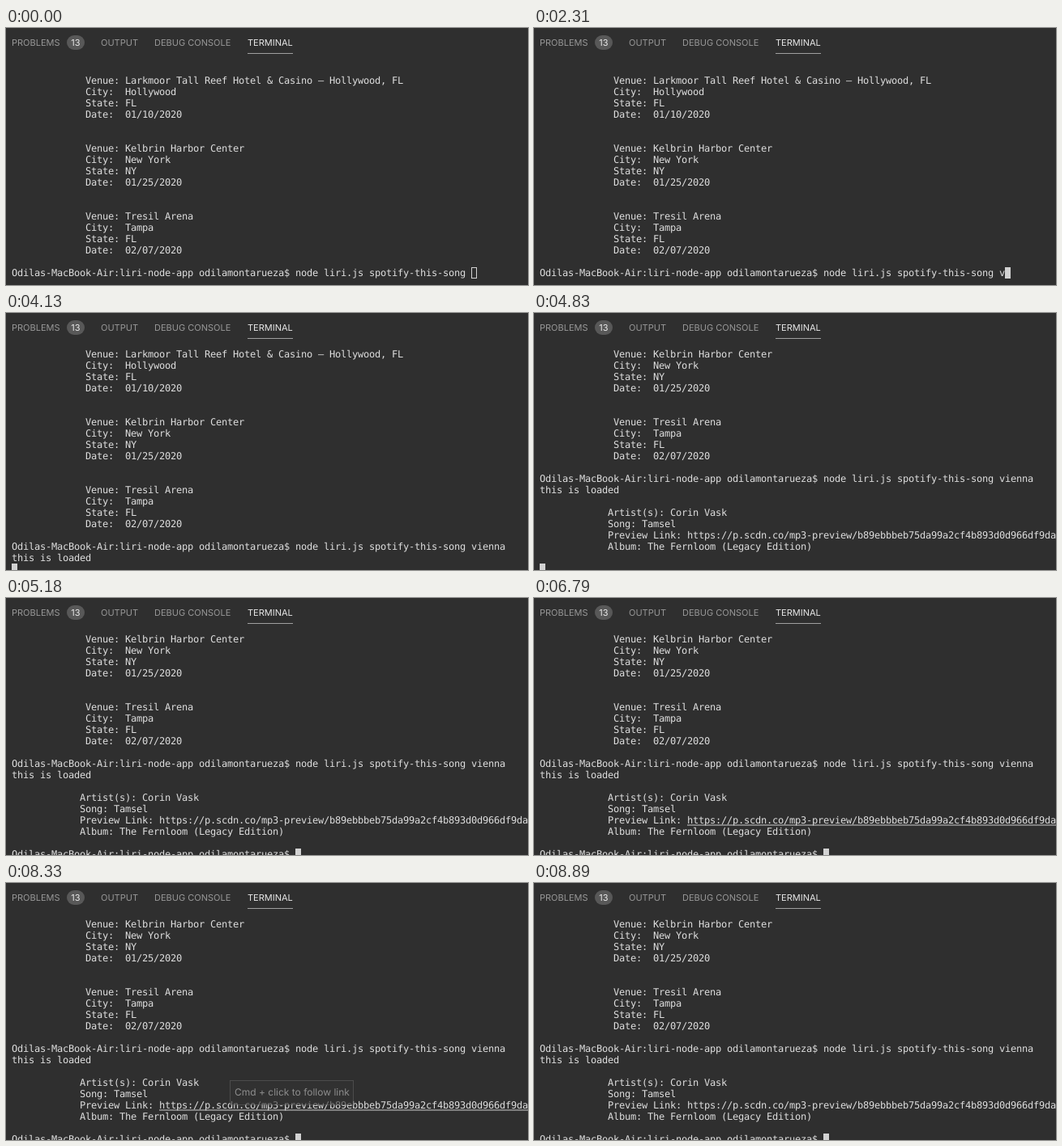
An HTML page that plays this animation: 644 px wide and 318 px high, repeating every 9170 ms.

```html
<!DOCTYPE html>
<html lang="en">
<head>
<meta charset="utf-8">
<title>Terminal</title>
<style>
  html, body { margin: 0; width: 100%; height: 100%; overflow: hidden; background: #2f2f2f; }
  svg { display: block; }
  text { white-space: pre; text-rendering: geometricPrecision; }
  .ui { font: 11px Inter, sans-serif; fill: #989898; }
  .ui .on { fill: #e9e9e9; }
  .term { font: 12px "DejaVu Sans Mono", monospace; fill: #dedede; }
  .tip { font: 12px Inter, sans-serif; fill: #cccccc; }
</style>
</head>
<body>
<svg id="stage" width="644" height="318" viewBox="0 0 644 318">
  <defs><clipPath id="view"><rect y="43" width="644" height="275"/></clipPath></defs>
  <rect width="644" height="318" fill="#2f2f2f"/>
  <g class="ui">
    <text x="7" y="22">PROBLEMS</text>
    <rect x="75" y="9" width="22" height="18" rx="9" fill="#585858"/>
    <text class="on" x="86" y="22" text-anchor="middle">13</text>
    <text x="117" y="22">OUTPUT</text>
    <text x="183" y="22">DEBUG CONSOLE</text>
    <text class="on" x="298" y="22">TERMINAL</text>
    <rect x="298" y="31" width="56" height="1" fill="#a0a0a0"/>
  </g>
  <g clip-path="url(#view)">
    <g id="lines" class="term"></g>
    <rect id="cursor" stroke="#d2d2d2"/>
    <rect id="underline" x="189" y="280.5" width="455" height="1" fill="#d0d0d0"/>
  </g>
  <g id="tip" class="tip">
    <rect x="276.5" y="244.5" width="152" height="30" fill="#333333" stroke="#606060"/>
    <text x="282" y="263">Cmd + click to follow link</text>
  </g>
</svg>
<script>
const LOOP = 9170, CELL = 7, ROW = 14, LEFT = 7, TOP = 44;
const FOCUS = 1120, ENTER = 3920, LOADED = 4060, RESULT = 4830, DONE = 4900;
const KEYS = [2310, 2520, 2730, 2940, 3080, 3290];
const WORD = 'vienna';
const PROMPT = 'Odilas-MacBook-Air:liri-node-app odilamontarueza$ ';
const COMMAND = PROMPT + 'node liri.js spotify-this-song ';

const $ = id => document.getElementById(id);
const set = (el, attrs) => {
  for (const key in attrs) el.setAttribute(key, attrs[key]);
};
const show = (el, on) => set(el, { visibility: on ? 'visible' : 'hidden' });
const within = (t, from, to) => t >= from && t < to;
const cellX = col => LEFT + col * CELL;

const lines = [];

// Each character sits in its own terminal cell.
function addLine(row, col, text, at = 0) {
  const el = document.createElementNS('http://www.w3.org/2000/svg', 'text');
  set(el, { x: [...text].map((_, i) => cellX(col + i)).join(' '), y: TOP + row * ROW + 11 });
  el.textContent = text;
  $('lines').append(el);
  lines.push({ el, at });
  return el;
}

function addShow(row, venue, city, state, date) {
  addLine(row, 13, 'Venue: ' + venue);
  addLine(row + 1, 13, 'City:  ' + city);
  addLine(row + 2, 13, 'State: ' + state);
  addLine(row + 3, 13, 'Date:  ' + date);
}

addShow(1, 'Larkmoor Tall Reef Hotel & Casino – Hollywood, FL', 'Hollywood', 'FL', '01/10/2020');
addShow(7, 'Kelbrin Harbor Center', 'New York', 'NY', '01/25/2020');
addShow(13, 'Tresil Arena', 'Tampa', 'FL', '02/07/2020');
addLine(18, 0, COMMAND);
const typed = addLine(18, COMMAND.length, WORD);
addLine(19, 0, 'this is loaded', LOADED);
[
  'Artist(s): Corin Vask',
  'Song: Tamsel',
  'Preview Link: https://p.scdn.co/mp3-preview/b89ebbbeb75da99a2cf4b893d0d966df9da',
  'Album: The Fernloom (Legacy Edition)'
].forEach((text, i) => addLine(21 + i, 12, text, RESULT));
addLine(26, 0, PROMPT, DONE);

function drawCursor(t, count) {
  const col = t < ENTER ? COMMAND.length + count : t < DONE ? 0 : PROMPT.length;
  const y = TOP + (t < ENTER ? 18 : 19) * ROW;
  const solid = t >= FOCUS;
  const inset = solid ? 0 : 0.5;
  set($('cursor'), {
    x: cellX(col) + inset, y: y + inset,
    width: CELL - 2 * inset, height: ROW - 2 * inset,
    fill: solid ? '#d2d2d2' : 'none',
    'stroke-width': solid ? 0 : 1
  });
}

function tipOpacity(t) {
  if (within(t, 8330, 8400)) return 0.6;
  if (within(t, 8400, 8820)) return 1;
  return within(t, 8820, 8890) ? 0.4 : 0;
}

function render(t) {
  const count = KEYS.filter(at => t >= at).length;
  const scroll = t < LOADED ? 0 : t < RESULT ? 1 : 7;
  typed.textContent = WORD.slice(0, count);
  lines.forEach(({ el, at }) => show(el, t >= at));
  set($('lines'), { transform: `translate(0 ${-scroll * ROW})` });
  drawCursor(t, count);
  show($('underline'), within(t, 6790, 6930) || within(t, 7770, 8540) || within(t, 8610, 8820));
  set($('tip'), { opacity: tipOpacity(t) });
}

const start = performance.now();
function tick() {
  render((performance.now() - start) % LOOP);
  requestAnimationFrame(tick);
}
tick();
</script>
</body>
</html>
```
